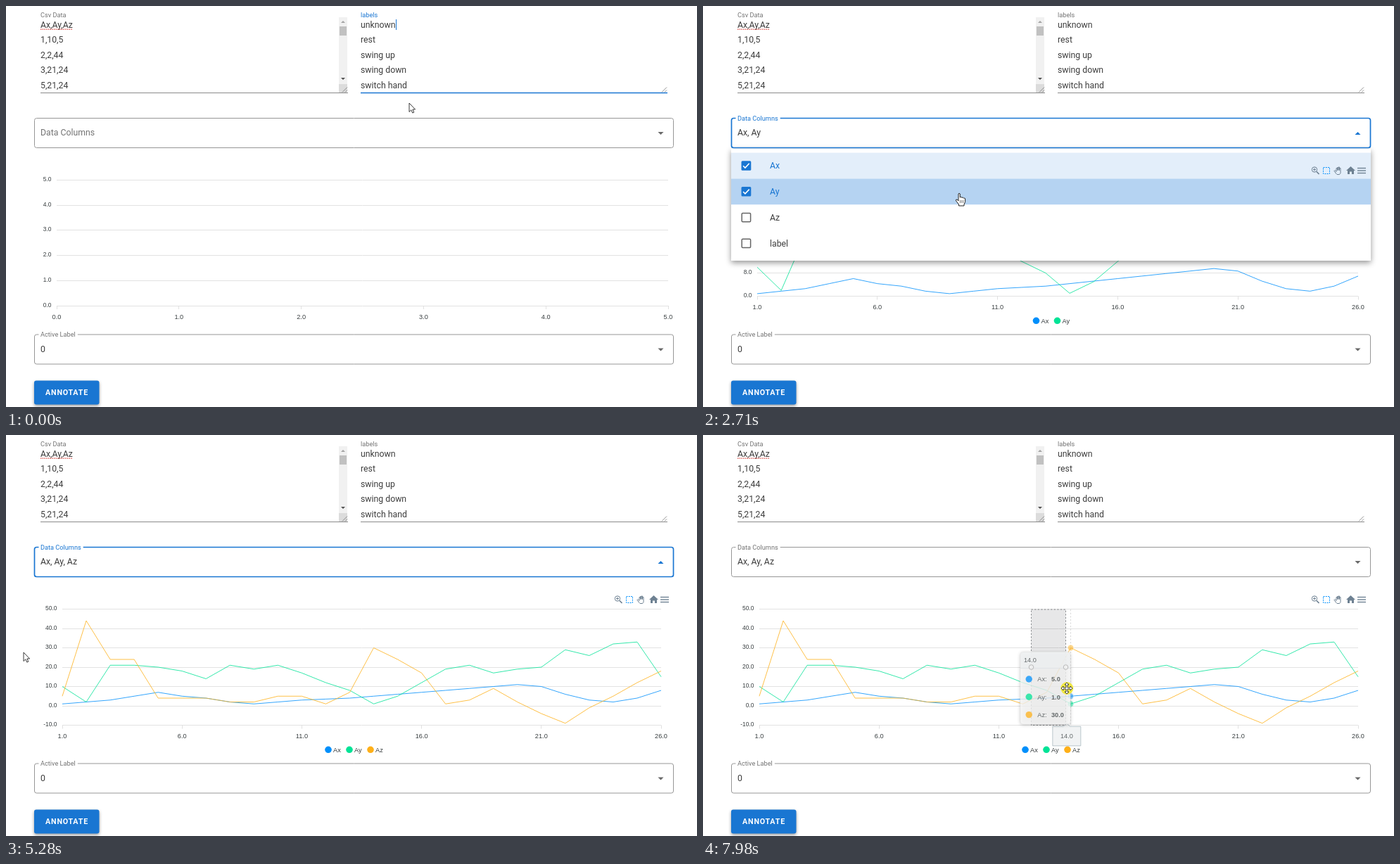
Recreate the animation shown at these times as an HTML page with a canvas. Size 982 px wide and 570 px high, loop 8 s.

```html
<!DOCTYPE html>
<html lang="en">
<head>
<meta charset="utf-8">
<style>
html, body { margin: 0; width: 100%; height: 100%; overflow: hidden; background: #fff; }
canvas { display: block; }
</style>
</head>
<body>
<canvas id="stage" width="982" height="570"></canvas>
<script>
const ctx = document.getElementById('stage').getContext('2d');
const LOOP = 8000;
const UI = 'Roboto, sans-serif', CHART = '"Liberation Sans", Arial, sans-serif';
const BLUE = '#1976d2', TEXT = '#3d3d3d', GRAY = '#737373';
const COLORS = ['#008ffb', '#00e396', '#feb019'];
const NAMES = ['Ax', 'Ay', 'Az'], OPTIONS = [...NAMES, 'label'];
const DATA = [
  [1,2,3,5,7,5,4,2,1,2,3,3.5,4,5,6,7,8,9,10,11,10,6,3,2,4,8],
  [10,2,21,21,20,18,14,21,19,21,17,12,8,1,5,12,19,21,17,19,20,29,26,32,33,15],
  [5,44,24,24,4,4,4,2,2,5,5,1,7,30,24,17,1,3,9,2,-4,-9,-1,5,12,18]
];

// Moments of the interaction
const FOCUS = 700, CLOSE = 5280, BLUR = 5360, PRESS = 7450, DRAG = 7770;
const CLICKS = [1690, 2390, 3889], SELECTS = [1840, 2540, 4150];

// Pointer path: time, x, y
const PATH = [
  [0,573,138], [80,573,138], [540,385,184], [1400,385,184], [1550,368,238],
  [2250,368,238], [2380,364,266], [3570,364,266], [3800,364,297], [4430,364,297],
  [5200,25,309], [5360,25,309], [5760,300,374], [5990,300,374], [6370,489,361],
  [6520,489,361], [6680,491,362], [7060,467,372], [7770,467,372], [7970,517,360]
];

// Chart layouts by number of series
const CHARTS = [
  { x0: 72, x1: 941, y1: 426, min: 0, max: 5, step: 1, from: 0, to: 5, xStep: 1 },
  { x0: 77, x1: 931, y1: 426, min: 0, max: 12, step: 2, from: 1, to: 26, xStep: 5 },
  { x0: 77, x1: 931, y1: 412.5, min: 0, max: 40, step: 8, from: 1, to: 26, xStep: 5 },
  { x0: 80, x1: 931, y1: 412.5, min: -10, max: 50, step: 10, from: 1, to: 26, xStep: 5 }
];
const TOP = 247.5;

const clamp = (v, a = 0, b = 1) => Math.min(b, Math.max(a, v));
const mix = (a, b, p) => a + (b - a) * p;

function pointer(t) {
  const i = PATH.findIndex(k => k[0] > t);
  if (i < 0) return PATH[PATH.length - 1].slice(1);
  const a = PATH[i - 1], b = PATH[i];
  const p = (t - a[0]) / (b[0] - a[0]), e = p * p * (3 - 2 * p);
  return [mix(a[1], b[1], e), mix(a[2], b[2], e)];
}

function text(s, x, y, size, color = TEXT, { font = UI, align = 'left', weight = 400 } = {}) {
  ctx.font = `${weight} ${size}px ${font}`;
  ctx.textAlign = align;
  ctx.fillStyle = color;
  ctx.fillText(s, x, y);
}
function line(x0, y0, x1, y1, color, width = 1) {
  ctx.strokeStyle = color;
  ctx.lineWidth = width;
  ctx.beginPath();
  ctx.moveTo(x0, y0);
  ctx.lineTo(x1, y1);
  ctx.stroke();
}
function rect(x, y, w, h, color) {
  ctx.fillStyle = color;
  ctx.fillRect(x, y, w, h);
}
function round(x, y, w, h, r, fill, stroke, width = 1) {
  ctx.beginPath();
  ctx.roundRect(x, y, w, h, r);
  if (fill) { ctx.fillStyle = fill; ctx.fill(); }
  if (stroke) { ctx.strokeStyle = stroke; ctx.lineWidth = width; ctx.stroke(); }
}
function dot(x, y, r, fill, stroke) {
  ctx.beginPath();
  ctx.arc(x, y, r, 0, 7);
  if (fill) { ctx.fillStyle = fill; ctx.fill(); }
  if (stroke) { ctx.strokeStyle = stroke; ctx.lineWidth = 1; ctx.stroke(); }
}
function shape(d, x, y, fill, stroke, width = 1) {
  const path = new Path2D(d);
  ctx.save();
  ctx.translate(x, y);
  if (fill) { ctx.fillStyle = fill; ctx.fill(path); }
  if (stroke) { ctx.strokeStyle = stroke; ctx.lineWidth = width; ctx.stroke(path); }
  ctx.restore();
}
function withShadow(color, blur, dy, draw) {
  ctx.save();
  ctx.shadowColor = color;
  ctx.shadowBlur = blur;
  ctx.shadowOffsetY = dy;
  draw();
  ctx.restore();
}

function textAreas(t) {
  text('Csv Data', 49, 15.5, 9.2, GRAY);
  ['Ax,Ay,Az', '1,10,5', '2,2,44', '3,21,24', '5,21,24']
    .forEach((s, i) => text(s, 49, 31 + i * 21.47, 12.27));
  ctx.setLineDash([1.5, 1.2]);
  line(49, 33.2, 95, 33.2, '#d9463f', 1.2);
  ctx.setLineDash([]);
  line(49, 123.5, 486, 123.5, '#8a8a8a');

  rect(473, 16, 12, 95, '#f1f1f1');
  rect(474, 29, 10, 13, '#c1c1c1');
  shape('M-3 2L0 -1L3 2Z', 479, 22, '#a3a3a3');
  shape('M-3 -1L0 2L3 -1Z', 479, 103, '#505050');
  rect(473, 111, 12, 12, '#dcdcdc');
  grip(485);

  const focused = t < FOCUS;
  text('labels', 504, 15.5, 9.2, focused ? BLUE : GRAY);
  ['unknown', 'rest', 'swing up', 'swing down', 'switch hand']
    .forEach((s, i) => text(s, 504, 31 + i * 21.47, 12.27));
  if (t < 160) line(554.5, 19, 554.5, 34, BLUE);
  if (focused) line(504, 123.5, 940, 123.5, BLUE, 1.7);
  else line(504, 123.5, 940, 123.5, '#8a8a8a');
  grip(939);
}
function grip(x) {
  line(x - 7, 122.5, x, 115.5, '#777', 0.8);
  line(x - 3, 122.5, x, 119.5, '#777', 0.8);
}

function field(y, { label, value, raised = 1, focused = false, hover = false }) {
  const border = focused ? BLUE : hover ? '#333' : '#979797';
  round(40.5, y + 0.5, 908, 42, 3, null, border, focused ? 1.7 : 1);
  const size = mix(12.27, 9.2, raised);
  if (raised > 0) {
    ctx.font = `400 9.2px ${UI}`;
    rect(46.5, y - 1, (ctx.measureText(label).width + 5.5) * raised, 3, '#fff');
  }
  text(label, 49, y + mix(25.2, 3.7, raised), size, focused ? BLUE : GRAY);
  text(value, 49, y + 25.2, 12.27);
  shape(focused ? 'M-4 2L0 -2L4 2Z' : 'M-4 -2L0 2L4 -2Z', 930.5, y + 22, focused ? BLUE : '#686868');
}

function dataField(t, count, [px, py]) {
  const open = t >= FOCUS && t < CLOSE, focused = t >= FOCUS && t < BLUR;
  const value = NAMES.slice(0, count).join(', ');
  field(159, {
    label: 'Data Columns', value, focused,
    raised: clamp((t - FOCUS) / 150),
    hover: py > 159 && py < 202 && px > 40
  });
  if (open && Math.floor((t - 690) / 530) % 2 === 0) {
    ctx.font = `400 12.27px ${UI}`;
    const x = 49.5 + Math.round(ctx.measureText(value + (count ? ' ' : '')).width);
    line(x, 173, x, 188, '#333');
  }
}

function scales(c) {
  return {
    X: v => c.x0 + (v - c.from) / (c.to - c.from) * (c.x1 - c.x0),
    Y: v => c.y1 - (v - c.min) / (c.max - c.min) * (c.y1 - TOP)
  };
}

function chart(t, count) {
  const c = CHARTS[count], { X, Y } = scales(c);
  for (let v = c.min; v <= c.max; v += c.step) {
    const y = Math.floor(Y(v)) + 0.5;
    line(c.x0, y, c.x1, y, '#e2e2e2');
    text(v.toFixed(1), c.x0 - 7.5, y + 1.7, 8.44, '#373d3f', { font: CHART, align: 'right' });
  }
  for (let v = c.from; v <= c.to; v += c.xStep) {
    const x = Math.floor(X(v)) + 0.5;
    line(x, c.y1, x, c.y1 + 5, '#e0e0e0');
    text(v.toFixed(1), X(v), c.y1 + 18.8, 9.2, '#373d3f', { font: CHART, align: 'center' });
  }
  if (!count) return;
  const grow = 1 - (1 - clamp((t - SELECTS[count - 1]) / 350)) ** 3;
  for (let s = 0; s < count; s++) {
    const k = s === 0 || s === 2 ? grow : 1;
    ctx.beginPath();
    DATA[s].forEach((v, i) => ctx.lineTo(X(i + 1), Y(v * k)));
    ctx.strokeStyle = COLORS[s];
    ctx.lineWidth = 0.8;
    ctx.stroke();
  }
  if (count > 1) {
    const left = count === 2 ? 473.5 : 458;
    for (let s = 0; s < count; s++) {
      dot(left + s * 30, 447.3, 4.8, COLORS[s]);
      text(NAMES[s], left + 7 + s * 30, 450.5, 9.2, '#373d3f', { font: CHART });
    }
  }
}

function toolbar() {
  const ink = '#6e8192';
  dot(869, 232.5, 3.7, null, ink);
  line(872, 235.5, 875.5, 239, ink, 1.7);
  line(867, 232.5, 871, 232.5, ink);
  line(869, 230.5, 869, 234.5, ink);
  ctx.setLineDash([2, 1.3]);
  ctx.strokeStyle = COLORS[0];
  ctx.strokeRect(881.5, 229.5, 9, 9);
  ctx.setLineDash([]);
  shape('M3 10L0 6L1 5L3 7V2H4.5V5V1H6V5V.5H7.5V5V2H9V9L7.5 11H4Z', 897, 228.5, null, ink, 1);
  shape('M0 -6L6.5 0H4.5V5H1.5V1.5H-1.5V5H-4.5V0H-6.5Z', 920.5, 234, ink);
  for (const y of [230.5, 234, 237.5]) line(930, y, 942, y, ink, 1.4);
}

function menu(t, count, [px, py]) {
  withShadow('rgba(0,0,0,.42)', 8, 3, () => rect(40, 203, 909, 159, '#fff'));
  OPTIONS.forEach((name, i) => {
    const top = 208.6 + i * 36.8, mid = top + 18.4, on = i < count;
    const hover = px > 40 && py >= top && py < top + 36.8;
    if (on || hover) rect(40, top, 909, 36.8, on ? (hover ? '#d5e6f7' : '#e3eefa') : '#f5f5f5');
    const age = t - CLICKS[i];
    if (age > 0 && age < 550) {
      const p = 1 - (1 - clamp(age / 250)) ** 2;
      ctx.save();
      ctx.beginPath();
      ctx.rect(40, top, 909, 36.8);
      ctx.clip();
      ctx.globalAlpha = 0.22 * (1 - clamp((age - 250) / 300));
      dot(mix(366, 494.5, p), mid, 488 * p, on ? BLUE : '#000');
      ctx.restore();
    }
    if (on) {
      round(54.5, mid - 6.8, 13.8, 13.6, 1.5, BLUE);
      shape('M-4.3 .2L-1.5 3L4.3 -3.2', 61.4, mid, null, '#fff', 1.6);
    } else {
      round(55.2, mid - 6.1, 12.4, 12.2, 1.2, '#fff', '#666', 1.5);
    }
    text(name, 95, mid + 4.4, 12.27, on ? BLUE : TEXT);
  });
}

const chart3 = scales(CHARTS[3]);
const indexAt = x => clamp(Math.round((x - 80) / 34.04), 0, 25);

function valueWidth(i) {
  return DATA.some(d => Math.abs(d[i]) >= 10) ? 71 : 65;
}
// Average over a short window gives the lagging glide of the boxes.
function glide(t, place) {
  let sum = 0;
  for (let k = 0; k < 18; k++) sum += place(indexAt(pointer(t - k * 5)[0]));
  return sum / 18;
}

function hoverInfo(t, px) {
  const i = indexAt(px), x = chart3.X(i + 1), fade = 1 - 0.25 * clamp((t - 7880) / 90);
  const mid = (CHARTS[3].x0 + CHARTS[3].x1) / 2;
  ctx.save();
  ctx.globalAlpha = fade < 1 ? 0.5 : 1;
  ctx.setLineDash([2.3, 2.3]);
  line(x, 248, x, 412, '#b6b6b6');
  ctx.setLineDash([]);
  DATA.forEach((d, s) => dot(x, chart3.Y(d[i]), 4.2, COLORS[s], '#fff'));
  ctx.globalAlpha = fade;

  const ax = glide(t, n => chart3.X(n + 1));
  shape('M-20 1H-4.5L0 -3.5L4.5 1H20V28.5H-20Z', ax, 413.3, '#eceff1', '#90a4ae', 0.8);
  text((i + 1).toFixed(1), ax, 431.4, 9.2, '#373d3f', { font: CHART, align: 'center' });

  const w = valueWidth(i);
  const left = glide(t, n => {
    const at = chart3.X(n + 1);
    return at > mid ? at - 10 - valueWidth(n) : at + 10;
  });
  withShadow('rgba(0,0,0,.3)', 5, 1, () => round(left, 308.5, w, 102.5, 4, '#fff'));
  round(left, 308.5, w, 23, [4, 4, 0, 0], '#eceff1');
  line(left, 331.5, left + w, 331.5, '#dde1e4');
  round(left, 308.5, w, 102.5, 4, null, '#e3e3e3', 0.8);
  text((i + 1).toFixed(1), left + 5, 323.2, 9.2, '#373d3f', { font: CHART });
  DATA.forEach((d, s) => {
    const y = 347 + s * 25.3;
    dot(left + 12.2, y, 4.7, COLORS[s]);
    text(NAMES[s] + ':', left + 24.3, y + 3.2, 9.2, '#373d3f', { font: CHART });
    text(d[i].toFixed(1), left + 44, y + 3.2, 9.2, '#373d3f', { font: CHART, weight: 700 });
  });
  ctx.restore();
}

function selection(px) {
  const w = Math.max(0, px - 1.5 - 466.5);
  rect(466.5, 248, w, 164.5, 'rgba(36,41,46,.11)');
  ctx.setLineDash([2.3, 2.3]);
  ctx.strokeStyle = 'rgba(36,41,46,.5)';
  ctx.lineWidth = 1;
  ctx.strokeRect(466.5, 248, w, 164.5);
  ctx.setLineDash([]);
}
function handles(px) {
  for (const x of [466.5, px - 1.5]) dot(x, 330, 3.3, 'rgba(240,240,240,.8)', '#b9b9b9');
}

function cursor(t, [x, y]) {
  const inMenu = t >= FOCUS && t < CLOSE && x > 40 && y > 203;
  if (t >= PRESS) dot(x + 0.3, y, 9, 'rgba(240,230,30,.82)');
  if (t >= 7840) {
    shape('M0 -8L3 -5H1V-1H5V-3L8 0L5 3V1H1V5H3L0 8L-3 5H-1V1H-5V3L-8 0L-5 -3V-1H-1V-5H-3Z',
      x, y, '#fff', '#333', 0.9);
  } else if (inMenu) {
    shape('M-1 1Q0 -.5 1.3 1V6Q3 5 4 6.3Q5.5 5.6 6.4 7Q8 6.5 8.6 8V12.5L7 16V18H-.5V16L-4.5 10.8Q-5 8.7 -3 9L-1 11Z',
      x, y, '#fff', '#222', 1);
    for (const d of [1.5, 3.7, 5.9]) line(x + d, y + 10, x + d, y + 14, '#444', 0.7);
  } else if (y > 160 && y < 202 && x > 46) {
    shape('M-3 -7H-1L0 -6L1 -7H3M0 -6V6M-3 7H-1L0 6L1 7H3', x, y, null, '#222', 1);
  } else {
    shape('M0 0V12.5L2.8 9.8L4.8 14L6.8 13.1L4.9 9H8.6Z', x, y, '#fff', '#222', 0.9);
  }
}

function button() {
  withShadow('rgba(0,0,0,.4)', 4, 2, () => round(40, 532.5, 92.5, 34, 3, BLUE));
  ctx.letterSpacing = '0.8px';
  text('ANNOTATE', 56, 553.3, 10.74, '#fff', { weight: 700 });
  ctx.letterSpacing = '0px';
}

function render(t) {
  const at = pointer(t), [px, py] = at;
  const count = SELECTS.filter(s => t >= s).length;
  rect(0, 0, 982, 570, '#fff');
  textAreas(t);
  chart(t, count);
  field(466.5, { label: 'Active Label', value: '0' });
  button();
  if (t >= FOCUS && t < CLOSE) menu(t, count, at);
  dataField(t, count, at);
  if (count) toolbar();
  if (t >= DRAG) selection(px);
  if (t > BLUR && px >= 80 && py > TOP && py < 412) hoverInfo(t, px);
  if (t >= DRAG) handles(px);
  cursor(t, at);
}

const start = performance.now();
function tick() {
  render((performance.now() - start) % LOOP);
  requestAnimationFrame(tick);
}
tick();
</script>
</body>
</html>
```
